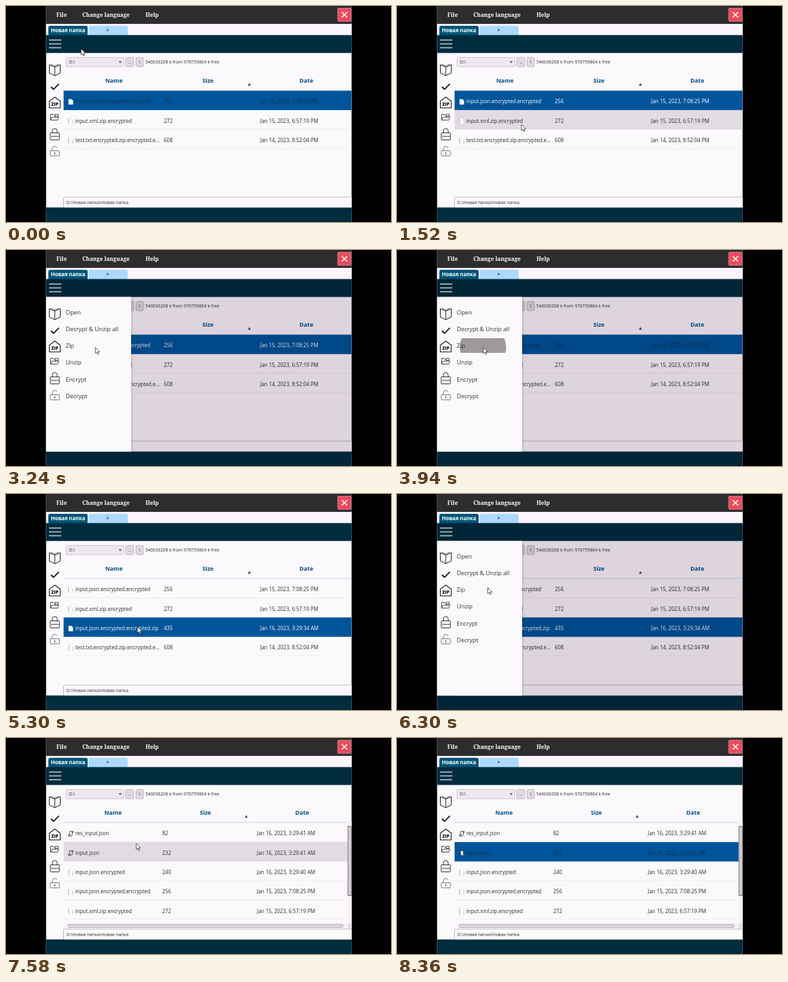
An HTML page with a canvas that plays this animation: 600x338 px, repeating every 8.39 s.

```html
<!DOCTYPE html>
<html lang="en">
<head>
<meta charset="utf-8">
<title>File manager</title>
<style>
html, body { margin: 0; width: 100%; height: 100%; overflow: hidden; background: #000; }
canvas { display: block; width: 600px; height: 338px; }
</style>
</head>
<body>
<canvas id="stage"></canvas>
<script>
const LOOP = 8390;
const cv = document.getElementById('stage');
const c = cv.getContext('2d');
const dpr = window.devicePixelRatio || 1;
cv.width = 600 * dpr;
cv.height = 338 * dpr;

const SANS = '"Open Sans", "Noto Sans", sans-serif';
const SERIF = '"Noto Serif", serif';
const PAGE = '#fcf9fc', BAR = '#002c3e', BLUE = '#00549a', INK = '#2f2c30';
const LEFT = 62.5, RIGHT = 538.6, HEAD = 45.5, BODY = 73.5, FOOT = 315.5;
const ROW_TOP = 132.6, ROW_H = 30.3, LIST = 89.5;

const first = ['input.json.encrypted.encrypted', '256', 'Jan 15, 2023, 7:08:25 PM'];
const xml = ['input.xml.zip.encrypted', '272', 'Jan 15, 2023, 6:57:19 PM'];
const test = ['test.txt.encrypted.zip.encrypted.e...', '608', 'Jan 14, 2023, 8:52:04 PM'];
const zipped = ['input.json.encrypted.encrypted.zip', '435', 'Jan 16, 2023, 3:29:34 AM'];
const unpacked = [
  ['res_input.json', '82', 'Jan 16, 2023, 3:29:41 AM'],
  ['input.json', '232', 'Jan 16, 2023, 3:29:41 AM'],
  ['input.json.encrypted', '240', 'Jan 16, 2023, 3:29:40 AM'],
  first, xml
];
const actions = ['Open', 'Decrypt & Unzip all', 'Zip', 'Unzip', 'Encrypt', 'Decrypt'];

// time, x, y of the pointer tip
const path = [
  [0, 117, 67], [250, 117, 67], [750, 162, 150], [950, 165, 152], [1350, 194, 185.5],
  [1850, 194, 185.5], [2250, 181, 151], [2600, 181, 151], [3400, 134.5, 152.5], [4250, 134.5, 152.5],
  [4950, 205, 208], [5450, 205, 208], [6050, 141.5, 146.5], [6350, 141.5, 146.5], [6650, 136, 123],
  [6950, 136, 123], [7400, 203, 165], [8250, 203, 165]
];

const clamp = v => Math.max(0, Math.min(1, v));
const easeOut = v => 1 - (1 - clamp(v)) ** 2;
const smooth = v => v * v * (3 - 2 * v);

function pointer(t) {
  for (let i = 1; i < path.length; i++) {
    const a = path[i - 1], b = path[i];
    if (t <= b[0]) {
      const k = smooth((t - a[0]) / (b[0] - a[0]));
      return [a[1] + (b[1] - a[1]) * k, a[2] + (b[2] - a[2]) * k];
    }
  }
  return null;
}

function drawerAt(t) {
  const open = s => easeOut((t - s) / 400);
  if (t < 4400) return open(2235);
  if (t < 5450) return 1 - open(4400);
  if (t < 6950) return open(5450);
  return 1 - open(6950);
}

function tableAt(t) {
  if (t < 4250) return { rows: [first, xml, test], sel: 0, focus: t > 780 && t < 3800 };
  if (t < 7050) {
    const late = t > 5100;
    return { rows: [first, xml, zipped, test], sel: late ? 2 : 0, focus: late && t < 6720 };
  }
  return { rows: unpacked, sel: t > 7900 ? 1 : -1, focus: t < 8150, scroll: true };
}

function rect(x, y, w, h, fill) {
  c.fillStyle = fill;
  c.fillRect(x, y, w, h);
}

function box(x, y, w, h, r, fill, line) {
  c.beginPath();
  c.roundRect(x, y, w, h, r);
  c.fillStyle = fill;
  c.fill();
  if (line) stroke(line, 1);
}

function stroke(color, width) {
  c.strokeStyle = color;
  c.lineWidth = width;
  c.stroke();
}

function poly(pts, closed) {
  c.beginPath();
  for (let i = 0; i < pts.length; i += 2) c.lineTo(pts[i], pts[i + 1]);
  if (closed) c.closePath();
}

function text(s, x, y, size, color, opt = {}) {
  c.font = `${opt.weight || 400} ${size}px ${opt.font || SANS}`;
  c.textAlign = opt.align || 'left';
  c.textBaseline = 'alphabetic';
  c.fillStyle = color;
  c.fillText(s, x, y);
}

function drawTop() {
  rect(62, 0, 477, 28, '#2d2c2e');
  const menu = { font: SERIF, weight: 700 };
  text('File', 78.5, 17, 8.6, '#fff', menu);
  text('Change language', 119, 17, 8.6, '#fff', menu);
  text('Help', 217.5, 17, 8.6, '#fff', menu);
  box(517, 3.5, 20.8, 20.5, 1, '#ee4a5c', '#c98a92');
  poly([523.2, 9.5, 531.8, 18]);
  stroke('#fff', 1.7);
  poly([531.8, 9.5, 523.2, 18]);
  stroke('#fff', 1.7);

  rect(62, 28, 477, HEAD - 28, '#fbf4fb');
  box(66, 31, 61.3, 15, [3, 3, 0, 0], '#005578');
  box(129, 31, 60.7, 15, [3, 3, 0, 0], '#acd9fd');
  text('Новая папка', 96.7, 41, 8.1, '#fff', { weight: 700, align: 'center' });
  text('+', 158.5, 41, 8, '#26323c', { weight: 600, align: 'center' });
  rect(62, HEAD, 477, BODY - HEAD, BAR);
  rect(62, FOOT, 477, 338 - FOOT, BAR);
}

function drawTools() {
  box(93.5, 80.5, 90, 14.5, 2, '#eee8ef', '#cbc4cc');
  text('D:\\', 98, 90.3, 7, INK);
  poly([175.5, 86.6, 180.5, 86.6, 178, 89.4], true);
  c.fillStyle = '#555';
  c.fill();
  box(186.5, 80.5, 12.5, 14.5, 2, '#e0dae1', '#bcb5bd');
  box(202.5, 80.5, 11.5, 14.5, 2, '#e0dae1', '#bcb5bd');
  text('..', 192.8, 90, 7, INK, { align: 'center' });
  text('\\', 208.2, 90.3, 7, INK, { align: 'center' });
  text('546036208 k from 976759804 k free', 217, 90.3, 6.9, INK);
}

function scrollIcon(y, selected) {
  c.beginPath();
  c.roundRect(99, y - 3.8, 4.6, 7.6, 1);
  if (selected) {
    c.fillStyle = '#fff';
    c.fill();
  }
  poly([99, y + 1.8, 99, y - 3.6, 104.8, y - 3.6, 104.8, y - 1.8, 103.2, y - 1.8]);
  stroke('#38353a', .9);
  poly([103.2, y - 3.6, 103.2, y + 2.5, 101.8, y + 3.8, 97.4, y + 3.8, 97, y + 2, 101, y + 2]);
  stroke('#38353a', .9);
}

function fileIcon(row, y, selected) {
  if (/json$/.test(row[0])) return scrollIcon(y, selected);
  poly([97.5, y - 4, 102, y - 4, 104.5, y - 1.5, 104.5, y + 4.5, 97.5, y + 4.5], true);
  c.fillStyle = selected ? '#fff' : PAGE;
  c.fill();
  if (selected) return;
  stroke('#eae3ea', .7);
  poly([97.5, y - 4, 97.5, y + 4.5]);
  stroke('#a59ea6', .8);
  poly([104.3, y - 1.5, 104.3, y + 4.5]);
  stroke('#c4bcc4', .8);
}

function drawTable(tb, hover) {
  const right = tb.scroll ? 532.5 : 539;
  const dx = tb.scroll ? 1 : 0;
  const head = { weight: 700, align: 'center' };
  text('Name', 168.3 - dx * 1.5, 120, 9.1, '#00508c', head);
  text('Size', 314.7 - dx * 4, 120, 9.1, '#00508c', head);
  text('Date', 468 - dx * 6.5, 120, 9.1, '#00508c', head);
  const ax = 379.3 - dx * 5;
  poly([ax - 2.4, 124.7, ax + 2.4, 124.7, ax, 120.6], true);
  c.fillStyle = '#4b474c';
  c.fill();
  rect(LIST, ROW_TOP - 1, 449, 1, '#c3d3e2');

  c.save();
  c.beginPath();
  c.rect(LIST, 131, right - LIST, 168);
  c.clip();
  tb.rows.forEach((row, i) => {
    const y = ROW_TOP + i * ROW_H;
    const sel = i === tb.sel;
    rect(LIST, y + ROW_H - .8, 449, .8, '#ebe5ec');
    if (sel) rect(LIST, y, 449, ROW_H, BLUE);
    else if (i === hover) rect(LIST, y, 449, ROW_H, '#e2dbe3');
    const color = sel ? (tb.focus ? '#fff' : '#12324f') : INK;
    const mid = 149.5 + i * ROW_H;
    fileIcon(row, mid + .2, sel);
    text(row[0], 108, mid + 2.9, 8.02, color);
    text(row[1], 246 - dx * 2.5, mid + 2.9, 8.02, color);
    text(row[2], 396 - dx * 5, mid + 2.9, 8.05, color);
  });
  c.restore();

  if (tb.scroll) {
    rect(LIST, 284, 443, 6, PAGE);
    rect(532.5, 131, 6.5, 160, '#f6f1f6');
    rect(532.5, 138, 6.5, 109, '#6a656b');
    rect(533.5, 139, 4.2, 107, '#d6cfd7');
    rect(LIST, 290, 449, 8, '#f8f4f8');
    box(96.5, 291.5, 429, 5, 2, '#ddd6de', '#b3acb4');
    rect(532.5, 290, 6.5, 8, '#e4dee5');
  }
  box(LIST, 299, 452, 17, 2, PAGE, '#b9b3ba');
  text('D:\\Новая папка\\Новая папка', 94, 310, 6.9, INK);
  rect(62, FOOT, 477, 5, BAR);
}

function drawIcons() {
  const ink = '#151316';
  c.lineJoin = 'round';
  // open book
  poly([67.5, 92, 76, 95.5, 84.5, 92, 84.5, 105, 76, 109, 67.5, 105], true);
  stroke(ink, 1);
  poly([76, 95.5, 76, 109]);
  stroke(ink, 1);
  poly([69.5, 91, 76, 94, 82.5, 91]);
  stroke(ink, .7);
  // check mark
  poly([70, 126.5, 74, 130.3, 82.5, 121.8]);
  stroke(ink, 1.9);
  // archive house
  poly([67.5, 149, 76, 142.5, 84.5, 149, 84.5, 159.5, 67.5, 159.5], true);
  stroke(ink, 1.1);
  text('ZIP', 76, 156, 7, ink, { weight: 800, align: 'center' });
  // folder
  poly([69.5, 178.5, 69.5, 169.5, 73.5, 169.5, 74.5, 171, 76, 171]);
  stroke(ink, .8);
  poly([69.5, 178.5, 71.5, 174, 82.5, 174, 80.5, 178.5], true);
  stroke(ink, .8);
  poly([76.5, 174, 76.5, 169.5, 82, 169.5, 80.8, 171, 82, 172.5, 76.5, 172.5]);
  stroke(ink, .7);
  lock(ink, 191.5, 11, false);
  lock('#69656b', 219.5, 8, true);
}

function lock(color, y, h, open) {
  c.beginPath();
  c.roundRect(69, y + 7, 14.2, h, 1);
  stroke(color, .9);
  c.beginPath();
  c.moveTo(72.2, y + 7);
  c.lineTo(72.2, y + 4);
  c.arc(76, y + 4, 3.8, Math.PI, open ? Math.PI * 1.9 : 0);
  if (!open) c.lineTo(79.8, y + 7);
  stroke(color, .9);
  if (open) {
    rect(75.3, y + 9.2, 1.5, 3.6, color);
  } else {
    for (let x = 71; x < 82; x += 3) rect(x, y + 11.8, 1.6, 1.6, color);
  }
}

function ripple(t, start, x, y, mid) {
  const age = t - start;
  if (age < 0 || age > 420) return;
  c.save();
  c.beginPath();
  c.rect(90, mid - 11.5, 104, 23);
  c.clip();
  c.globalAlpha = .85 * (1 - clamp((age - 200) / 220));
  c.beginPath();
  c.arc(x, y, 8 + 28 * easeOut(age / 180), 0, Math.PI * 2);
  c.fillStyle = '#8d888d';
  c.fill();
  c.restore();
}

function drawDrawer(p, t) {
  if (p <= 0) return;
  c.save();
  c.globalCompositeOperation = 'multiply';
  c.globalAlpha = p;
  rect(62, HEAD, 477, 338 - HEAD, '#e0d9e1');
  c.restore();

  const w = 133 * p;
  const edge = 62 + w;
  const shade = c.createLinearGradient(edge, 0, edge + 4, 0);
  shade.addColorStop(0, 'rgba(0,0,0,.12)');
  shade.addColorStop(1, 'rgba(0,0,0,0)');
  rect(edge, BODY, 4, FOOT - BODY, shade);
  rect(62, BODY, w, FOOT - BODY, PAGE);
  c.save();
  c.beginPath();
  c.rect(LIST, BODY, Math.max(0, edge - LIST), FOOT - BODY);
  c.clip();
  ripple(t, 3740, 134, 152, 149.5);
  ripple(t, 6700, 136, 123, 123.5);
  actions.forEach((s, i) => text(s, 93 + w - 133, 100.7 + i * 26.2, 9.25, '#343136'));
  c.restore();
}

function drawPointer(x, y) {
  poly([x, y, x, y + 9.5, x + 2.2, y + 7.5, x + 3.8, y + 11, x + 5.3, y + 10.3,
    x + 3.8, y + 7, x + 6.7, y + 6.8], true);
  c.fillStyle = '#fff';
  c.fill();
  stroke('#2b282c', .8);
}

function draw(t) {
  c.setTransform(dpr, 0, 0, dpr, 0, 0);
  rect(0, 0, 600, 338, '#000');
  c.save();
  c.beginPath();
  c.rect(LEFT, 0, RIGHT - LEFT, 338);
  c.clip();
  rect(62, 0, 477, 338, PAGE);
  drawTop();
  drawTools();

  const pos = pointer(t);
  const p = drawerAt(t);
  const tb = tableAt(t);
  let hover = -1;
  if (pos && pos[0] > (p > 0 ? 62 + 133 * p : LIST) && pos[1] >= ROW_TOP) {
    hover = Math.floor((pos[1] - ROW_TOP) / ROW_H);
  }
  drawTable(tb, hover);
  drawDrawer(p, t);
  drawIcons();
  for (let i = 0; i < 3; i++) rect(67, 52.3 + i * 6, 19.3, 2, '#a3acb1');
  if (pos) drawPointer(pos[0], pos[1]);
  c.restore();
}

const begin = performance.now();
function tick() {
  draw((performance.now() - begin) % LOOP);
  requestAnimationFrame(tick);
}
tick();
</script>
</body>
</html>
```
